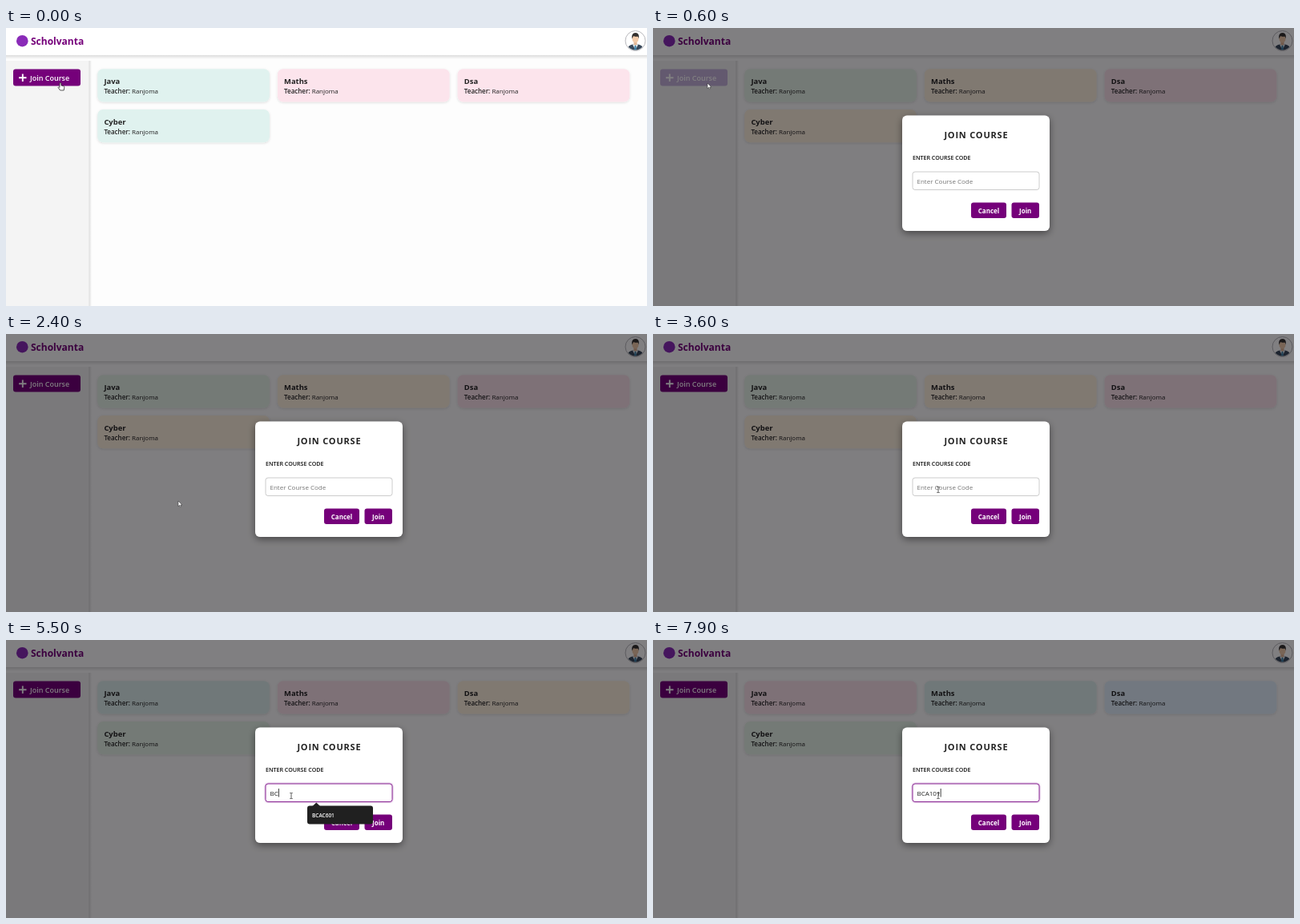
An HTML page for the animation above (8 s loop, 800 px wide and 348 px high).

```html
<!DOCTYPE html>
<html lang="en">
<head>
<meta charset="utf-8">
<title>Join course</title>
<style>
  html, body { margin: 0; width: 100%; height: 100%; overflow: hidden; background: #fdfdfd; }
  svg { display: block; width: 800px; height: 348px; }
  text { font-family: "Open Sans", "Noto Sans", sans-serif; font-size: 8px; fill: #222; white-space: pre; }
  .semi { font-weight: 600; }
  .bold { font-weight: 700; }
  .white { fill: #fff; }
  .title { font-size: 9.4px; font-weight: 700; }
</style>
</head>
<body>
<svg viewBox="0 0 800 348" xmlns="http://www.w3.org/2000/svg">
  <defs>
    <filter id="soft" x="-20%" y="-30%" width="140%" height="170%">
      <feDropShadow dx="0" dy="1" stdDeviation="1.6" flood-opacity=".13"/>
    </filter>
    <filter id="deep" x="-20%" y="-20%" width="140%" height="150%">
      <feDropShadow dx="0" dy="3" stdDeviation="5" flood-opacity=".45"/>
    </filter>
    <filter id="glow" x="-10%" y="-50%" width="120%" height="200%">
      <feDropShadow dx="0" dy="0" stdDeviation="1.3" flood-color="#80008a" flood-opacity=".55"/>
    </filter>
    <linearGradient id="below" x2="0" y2="1">
      <stop stop-color="#000" stop-opacity=".13"/><stop offset="1" stop-color="#000" stop-opacity="0"/>
    </linearGradient>
    <linearGradient id="beside">
      <stop stop-color="#000" stop-opacity=".13"/><stop offset="1" stop-color="#000" stop-opacity="0"/>
    </linearGradient>
    <clipPath id="round"><circle cx="785.5" cy="16" r="11.5"/></clipPath>
  </defs>

  <rect width="800" height="348" fill="#fdfdfd"/>
  <rect y="41" width="103.5" height="307" fill="#f4f4f4"/>
  <rect x="103.5" y="41" width="3.5" height="307" fill="url(#beside)"/>
  <rect width="800" height="34" fill="#fff"/>
  <rect y="34" width="800" height="5" fill="url(#below)"/>

  <circle cx="20.3" cy="16.2" r="7.3" fill="#8a2bb8"/>
  <text class="bold" x="31" y="21" style="font-size:12px;fill:#75007a">Scholvanta</text>

  <circle cx="785.5" cy="16" r="12.5" fill="#fff" stroke="#b9b9bd"/>
  <g clip-path="url(#round)">
    <path d="M775 29q0-7 7-8.500h7q7 1.500 7 8.500z" fill="#39485a"/>
    <path d="M782 20.500h7l-3.500 7z" fill="#f2f5f7"/>
    <path d="M784.700 21.500h1.600l.6 5-1.400 1.500-1.400-1.500z" fill="#3b7fa6"/>
    <path d="M783.500 16h4v4.500l-2 1.500-2-1.500z" fill="#e3b695"/>
    <ellipse cx="785.5" cy="13.500" rx="4" ry="5" fill="#f2cbaa"/>
    <path d="M781.200 13.500q-1-7.500 4.500-7.500 5.200 0 4.100 7.500l-1-2.800q-3 .5-5.600-.7z" fill="#33302f"/>
  </g>

  <rect id="joinCourse" x="9" y="51.500" width="84" height="21" rx="3"/>
  <path d="M20.800 57.500v9.400M16.100 62.200h9.400" stroke="#fff" stroke-width="1.900"/>
  <text class="semi white" x="30" y="65.500" style="font-size:9px">Join Course</text>
  <g id="cards"></g>

  <g id="dialog">
    <rect width="800" height="348" fill="#030004" opacity=".5"/>
    <rect x="311" y="109.500" width="184" height="144.500" rx="6" fill="#fff" filter="url(#deep)"/>
    <text class="bold" x="403.400" y="138" text-anchor="middle" style="font-size:11px;letter-spacing:.8px">JOIN COURSE</text>
    <text class="semi" x="324" y="164.500" style="font-size:7.100px;fill:#111">ENTER COURSE CODE</text>
    <rect id="field" x="324" y="180" width="158" height="22.500" rx="3" fill="#fff"/>
    <text id="hint" x="329.500" y="194.500" style="fill:#757575">Enter Course Code</text>
    <text id="typed" x="329.500" y="194.500"></text>
    <rect id="caret" y="186" width=".8" height="10.500" fill="#111"/>
    <g fill="#75007a">
      <rect x="397" y="218.500" width="44" height="19.500" rx="3"/>
      <rect x="447.500" y="218.500" width="34.500" height="19.500" rx="3"/>
    </g>
    <text class="bold white" x="419" y="231.500" text-anchor="middle">Cancel</text>
    <text class="bold white" x="464.700" y="231.500" text-anchor="middle">Join</text>
    <g id="suggestion">
      <path d="M382.500 208l4.800-4.500 4.800 4.500z" fill="#202020"/>
      <rect x="376" y="207.500" width="82" height="23" rx="3" fill="#202020"/>
      <text class="semi white" x="382" y="221.500" style="font-size:6.500px">BCAC601</text>
    </g>
  </g>

  <path id="hand" d="M-1 0q1-1 1.900 0v3l3 .7q1 .3.9 1.500l-.6 3.800h-4.600l-2.500-3.400q.2-1.300 1.900-.3z" fill="#fff" stroke="#222" stroke-width=".75"/>
  <path id="arrow" d="M0 0v6.700l1.600-1.400 1.100 2.400 1-.5-1-2.300h2.100z" fill="#fff" stroke="#222" stroke-width=".5"/>
  <path id="beam" d="M-1.700-3.500h1.300l.4.400.4-.4h1.300M0-3.200v6.400M-1.700 3.500h1.300l.4-.4.4.4h1.300" fill="none" stroke="#333" stroke-width=".8"/>
</svg>
<script>
const LOOP = 8000, OPEN = 600, FOCUS = 3700;
const PURPLE = [117, 0, 122], PALE = [225, 241, 252];
const TINTS = { teal: '#e0f2ef', pink: '#fce4ec', green: '#e8f5e9', orange: '#fff3e0',
                red: '#ffebee', purple: '#f3e5f5', blue: '#e3f2fd' };

// Every render of the page picks new card tints.
const renders = [
  { at: 0,    text: '',       tints: 'teal pink pink teal' },
  { at: OPEN, text: '',       tints: 'green orange pink orange' },
  { at: 4400, text: 'B',      tints: 'red purple purple blue' },
  { at: 5400, text: 'BC',     tints: 'teal pink orange green' },
  { at: 6300, text: 'BCA',    tints: 'green orange green pink' },
  { at: 6900, text: 'BCA1',   tints: 'blue green purple orange' },
  { at: 7300, text: 'BCA10',  tints: 'orange purple teal blue' },
  { at: 7700, text: 'BCA101', tints: 'pink teal blue green' }
];
const pointerPath = [[0, 68, 69], [700, 68, 69], [1700, 215, 209], [2750, 215, 209], [3500, 356, 195], [LOOP, 356, 195]];

const $ = id => document.getElementById(id);
const show = (id, on) => { $(id).style.display = on ? '' : 'none'; };
const clamp = v => Math.min(1, Math.max(0, v));
const ease = v => v * v * (3 - 2 * v);
const mix = (a, b, k) => a + (b - a) * k;

$('cards').innerHTML = ['Java', 'Maths', 'Dsa', 'Cyber'].map((name, i) => {
  const x = 114.2 + (i % 3) * 224.7, y = 51.3 + Math.floor(i / 3) * 50.7;
  return `<rect x="${x}" y="${y}" width="214.700" height="41.300" rx="7" filter="url(#soft)"/>
    <text class="title" x="${x + 8.2}" y="${y + 18.5}">${name}</text>
    <text x="${x + 8.2}" y="${y + 30.5}"><tspan class="semi">Teacher:</tspan> Ranjoma</text>`;
}).join('');
const cardRects = $('cards').querySelectorAll('rect');

function pointerAt(t) {
  const i = pointerPath.findIndex(p => p[0] > t);
  const [t0, x0, y0] = pointerPath[i - 1], [t1, x1, y1] = pointerPath[i];
  const k = ease((t - t0) / (t1 - t0));
  return [mix(x0, x1, k), mix(y0, y1, k)];
}

function draw(t) {
  const state = renders.filter(r => r.at <= t).pop();
  const open = t >= OPEN, focused = t >= FOCUS;

  const tints = state.tints.split(' ');
  cardRects.forEach((r, i) => r.setAttribute('fill', TINTS[tints[i]]));

  const hover = open ? 0.75 * (1 - clamp((t - OPEN) / 250)) : ease(clamp((t - 50) / 300));
  $('joinCourse').setAttribute('fill', `rgb(${PURPLE.map((c, i) => Math.round(mix(c, PALE[i], hover)))})`);

  show('dialog', open);
  $('field').setAttribute('stroke', focused ? '#8b2a96' : '#ccc');
  $('field').setAttribute('filter', focused ? 'url(#glow)' : 'none');
  show('hint', !state.text);
  $('typed').textContent = state.text;
  const width = state.text && open ? $('typed').getComputedTextLength() : 0;
  $('caret').setAttribute('x', 329.7 + width);
  show('caret', focused && (t - Math.max(FOCUS, state.at)) % 1060 < 530);
  show('suggestion', state.text && 'BCAC601'.startsWith(state.text));

  const [x, y] = pointerAt(t);
  const inField = x > 324 && x < 482 && y > 180 && y < 202.5;
  const kind = !open ? 'hand' : inField ? 'beam' : 'arrow';
  for (const id of ['hand', 'arrow', 'beam']) show(id, id === kind);
  $(kind).setAttribute('transform', `translate(${x} ${y})`);
}

const start = performance.now();
function tick() {
  draw((performance.now() - start) % LOOP);
  requestAnimationFrame(tick);
}
tick();
</script>
</body>
</html>
```
